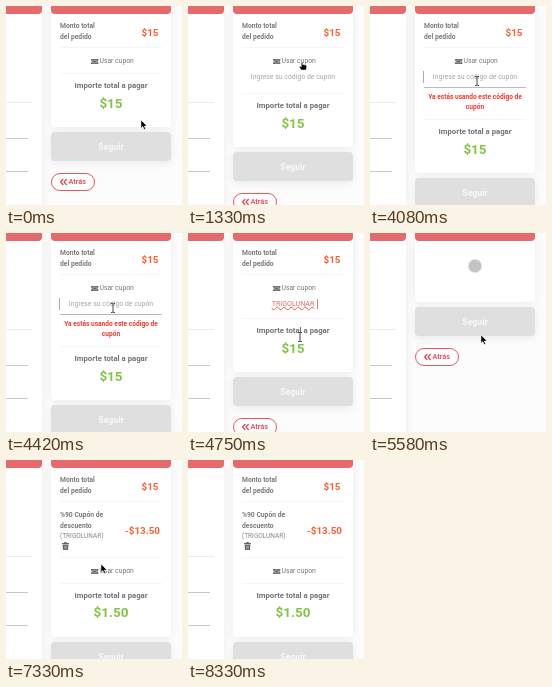
An HTML page for the animation above (8.76 s loop, 176 by 199 pixels).

```html
<!DOCTYPE html>
<html lang="es">
<head>
<meta charset="utf-8">
<title>Cupón de descuento</title>
<style>
@property --s { syntax: "<length>"; inherits: true; initial-value: 0px; }

html, body { margin: 0; width: 100%; height: 100%; overflow: hidden; background: #fcfcfc; }
.stage {
  position: relative; width: 176px; height: 199px; overflow: hidden;
  font: 400 6.8px/10px Roboto, "Open Sans", sans-serif; color: #777;
  animation: shift 8760ms step-end infinite;
}
.stage * { position: absolute; box-sizing: border-box; white-space: nowrap; }
.stage svg { overflow: visible; }
.stage svg * { position: static; }

/* every timed part shares one clock */
.on { animation: 8760ms step-end infinite; }

.card { background: #fff; border-radius: 0 0 4px 4px; box-shadow: 0 1px 10px rgba(0,0,0,.07); }
.card::before {
  content: ""; position: absolute; top: 0; left: 0; right: 0; height: 8px;
  border-radius: 0 0 4px 4px; background: #e56a6c;
}
.side { left: -10px; top: 0; width: 45.5px; height: 220px; }
.main { left: 45px; top: 0; width: 120px; height: calc(121px + var(--s)); }
.line { left: 0; width: 22px; height: 1px; background: #c8c8c8; }
.rule { left: 54px; width: 102px; height: 1px; background: #f5f5f5; }

.group { left: 0; top: 0; width: 176px; height: 0; }
.move { transform: translateY(var(--s)); }
.mid { left: 45px; width: 120px; text-align: center; }
.label { left: 54px; font-size: 6.75px; font-weight: 700; color: #7a7a7a; line-height: 10.5px; }
.price { font-size: 9.9px; font-weight: 700; color: #fa6132; }
.total { font-size: 13.5px; font-weight: 700; color: #83c447; }

.button {
  left: 45px; top: 126px; width: 120px; height: 29px; border-radius: 4px; background: #dfdfdf;
  box-shadow: 0 2px 8px rgba(0,0,0,.08); color: #f8f8f8; font-size: 8.7px; font-weight: 700;
  line-height: 30px; text-align: center;
}
.back { left: 45px; top: 167px; width: 43.5px; height: 18px; border: 1px solid #e65560; border-radius: 9px; background: #fff; }
.back span { left: 16.5px; top: 3px; font-size: 7.4px; font-weight: 500; color: #e2414d; }

.hint { font-size: 6.9px; color: #a6a6a6; }
.code { color: #e26a6a; }
.code span { position: static; text-decoration: underline wavy #ea5a52 .5px; text-underline-offset: 0; }
.error { font-size: 6.6px; font-weight: 700; color: #f0392f; line-height: 10.4px; }
.dot {
  left: 98px; top: 26px; width: 14px; height: 14px; border-radius: 50%; background: #c3c3c3;
  animation: pulse 8760ms ease-in-out infinite;
}

.idle { animation-name: idle; }
.usar { animation-name: usar; }
.load { animation-name: load; }
.field { animation-name: field; }
.focus { animation-name: focus; }
.typed { animation-name: typed; }
.before { animation-name: before; }
.after { animation-name: after; }
.cursor { left: 0; top: 0; width: 0; height: 0; animation: path 8760ms linear infinite; }
.arrow { animation-name: arrow; }
.hand { animation-name: hand; }
.beam { animation-name: beam; }

@keyframes shift {
  0% { --s: 0px; } 13.3% { --s: 20px; } 46.52% { --s: 46px; }
  51.31% { --s: 18px; } 57.02% { --s: -52px; } 67.47%, 100% { --s: 56px; }
}
@keyframes idle { 0% { opacity: 1; } 57.02% { opacity: 0; } 67.47%, 100% { opacity: 1; } }
@keyframes usar {
  0% { opacity: 1; transform: none; } 57.02% { opacity: 0; transform: none; }
  67.47%, 100% { opacity: 1; transform: translateY(56px); }
}
@keyframes load { 0% { opacity: 0; } 57.02% { opacity: 1; } 67.47%, 100% { opacity: 0; } }
@keyframes field { 0% { opacity: 0; } 13.3% { opacity: 1; } 51.31%, 100% { opacity: 0; } }
@keyframes focus { 0% { opacity: 0; } 46.52% { opacity: 1; } 51.31%, 100% { opacity: 0; } }
@keyframes typed { 0% { opacity: 0; } 51.31% { opacity: 1; } 57.02%, 100% { opacity: 0; } }
@keyframes before { 0% { opacity: 1; } 57.02%, 100% { opacity: 0; } }
@keyframes after { 0% { opacity: 0; } 67.47%, 100% { opacity: 1; } }
@keyframes pulse {
  0%, 57.02% { transform: scale(.2); } 63.64% { transform: scale(.95); } 67.47%, 100% { transform: scale(.5); }
}
@keyframes arrow {
  0% { opacity: 1; } 7.6% { opacity: 0; } 17% { opacity: 1; } 26.54% { opacity: 0; }
  57.02% { opacity: 1; } 95.03%, 100% { opacity: 0; }
}
@keyframes hand { 0% { opacity: 0; } 7.6% { opacity: 1; } 17%, 100% { opacity: 0; } }
@keyframes beam { 0% { opacity: 0; } 26.54% { opacity: 1; } 57.02%, 100% { opacity: 0; } }
@keyframes path {
  0% { transform: translate(135px,114px); animation-timing-function: steps(9); }
  8.5% { transform: translate(114px,56px); }
  15.13% { transform: translate(114px,56px); animation-timing-function: steps(8); }
  22.77% { transform: translate(113px,85px); animation-timing-function: steps(2); }
  24.66% { transform: translate(118px,98px); animation-timing-function: step-end; }
  26.54% { transform: translate(120px,103px); }
  28.48% { transform: translate(120px,103px); animation-timing-function: steps(4); }
  32.25% { transform: translate(88px,97px); }
  33.22% { transform: translate(88px,97px); animation-timing-function: steps(4); }
  36.99% { transform: translate(113px,82px); animation-timing-function: steps(3); }
  39.9% { transform: translate(107px,75px); }
  51.31% { transform: translate(107px,75px); animation-timing-function: steps(3); }
  54.17% { transform: translate(112px,104px); }
  57.01% { transform: translate(112px,104px); animation-timing-function: step-end; }
  57.02% { transform: translate(112px,109px); }
  57.99% { transform: translate(112px,109px); animation-timing-function: steps(6); }
  63.64% { transform: translate(111px,102px); }
  66.55% { transform: translate(111px,102px); animation-timing-function: steps(11); }
  77% { transform: translate(98px,145px); }
  79.85% { transform: translate(98px,145px); animation-timing-function: steps(4); }
  83.62% { transform: translate(95px,104px); animation-timing-function: steps(7); }
  90.3% { transform: translate(46px,40px); animation-timing-function: steps(5); }
  95.03%, 100% { transform: translate(20px,-12px); }
}
</style>
</head>
<body>
<div class="stage">
  <div class="card side"></div>
  <div class="line" style="top:96px;width:26px;background:#ececec"></div>
  <div class="line" style="top:132px"></div>
  <div class="line" style="top:165px"></div>

  <div class="card main"></div>

  <div class="group on idle">
    <div class="label" style="top:15px">Monto total<br>del pedido</div>
    <div class="price" style="right:23.5px;top:22px">$15</div>
    <div class="rule" style="top:41px"></div>
  </div>

  <div class="group on after">
    <div class="label" style="top:50px">%90 Cupón de<br>descuento</div>
    <div class="label" style="top:71px;font-size:6.5px;font-weight:400;color:#888">(TRIGOLUNAR)</div>
    <svg style="left:56px;top:82px" width="7" height="8" fill="#666">
      <path d="M0 1h2l.5-1h2L5 1h2v1H0zM.5 2.6h6L6 8H1z"/>
      <path d="M2.4 3.6v3.3M3.5 3.6v3.3M4.6 3.6v3.3" stroke="#ddd" stroke-width=".4"/>
    </svg>
    <div class="price" style="right:22px;top:66px">-$13.50</div>
    <div class="rule" style="top:97px"></div>
  </div>

  <div class="group on usar">
    <svg style="left:84.5px;top:52.5px" width="8" height="5">
      <path d="M0 0h7.4v1.6a.9.9 0 0 0 0 1.8V5H0V3.4a.9.9 0 0 0 0-1.8z" fill="#6a6a6a"/>
      <path d="M1.8 1.2h3.8v2.6H1.8z" fill="none" stroke="#ccc" stroke-width=".5"/>
    </svg>
    <div style="left:93.5px;top:50px">Usar cupon</div>
  </div>

  <div class="group on field"><div class="mid hint" style="top:66px">Ingrese su código de cupón</div></div>
  <div class="group on focus">
    <div style="left:53px;top:65px;width:1px;height:12px;background:#aaa"></div>
    <div class="rule" style="top:81px;background:#bcbcbc"></div>
    <div class="mid error" style="top:86px">Ya estás usando este código de<br>cupón</div>
  </div>
  <div class="group on typed">
    <div class="mid code" style="top:66px;font-size:7.1px"><span>TRIGOLUNAR</span></div>
    <div style="left:129px;top:66px;width:1px;height:10px;background:#e08080"></div>
  </div>

  <div class="group move">
    <div class="group on idle">
      <div class="rule" style="top:67px"></div>
      <div class="mid" style="top:75px;font-size:7.75px;font-weight:700;color:#747474">Importe total a pagar</div>
      <div class="mid total on before" style="top:92px">$15</div>
      <div class="mid total on after" style="top:91px">$1.50</div>
    </div>
    <div class="button">Seguir</div>
    <div class="back">
      <svg style="left:8px;top:5px" width="7" height="6" fill="none" stroke="#e2414d" stroke-width="1.2">
        <path d="M3.2 0L.6 3l2.6 3M6.6 0L4 3l2.6 3"/>
      </svg>
      <span>Atrás</span>
    </div>
  </div>

  <div class="group on load"><div class="dot"></div></div>

  <div class="cursor">
    <svg class="on arrow" width="7" height="10">
      <path d="M0 0V8.2L1.9 6.5 3.2 9.5 4.6 8.9 3.3 6H6z" stroke="#fff" stroke-width=".5"/>
    </svg>
    <svg class="on hand" width="8" height="9">
      <path d="M-.7.6Q0-.3.7.6V2.6L4 3.2Q4.8 3.4 4.7 4.5L4 8H-.8L-2.7 5Q-2.6 4-1.6 4.4L-.7 5z" stroke="#fff" stroke-width=".4"/>
    </svg>
    <svg class="on beam" width="5" height="10">
      <path d="M-2-4.5H-.6L0-4 .6-4.5H2M0-4V4M-2 4.5H-.6L0 4l.6.5H2" fill="none" stroke="#444" stroke-width="1"/>
    </svg>
  </div>
</div>
</body>
</html>
```
